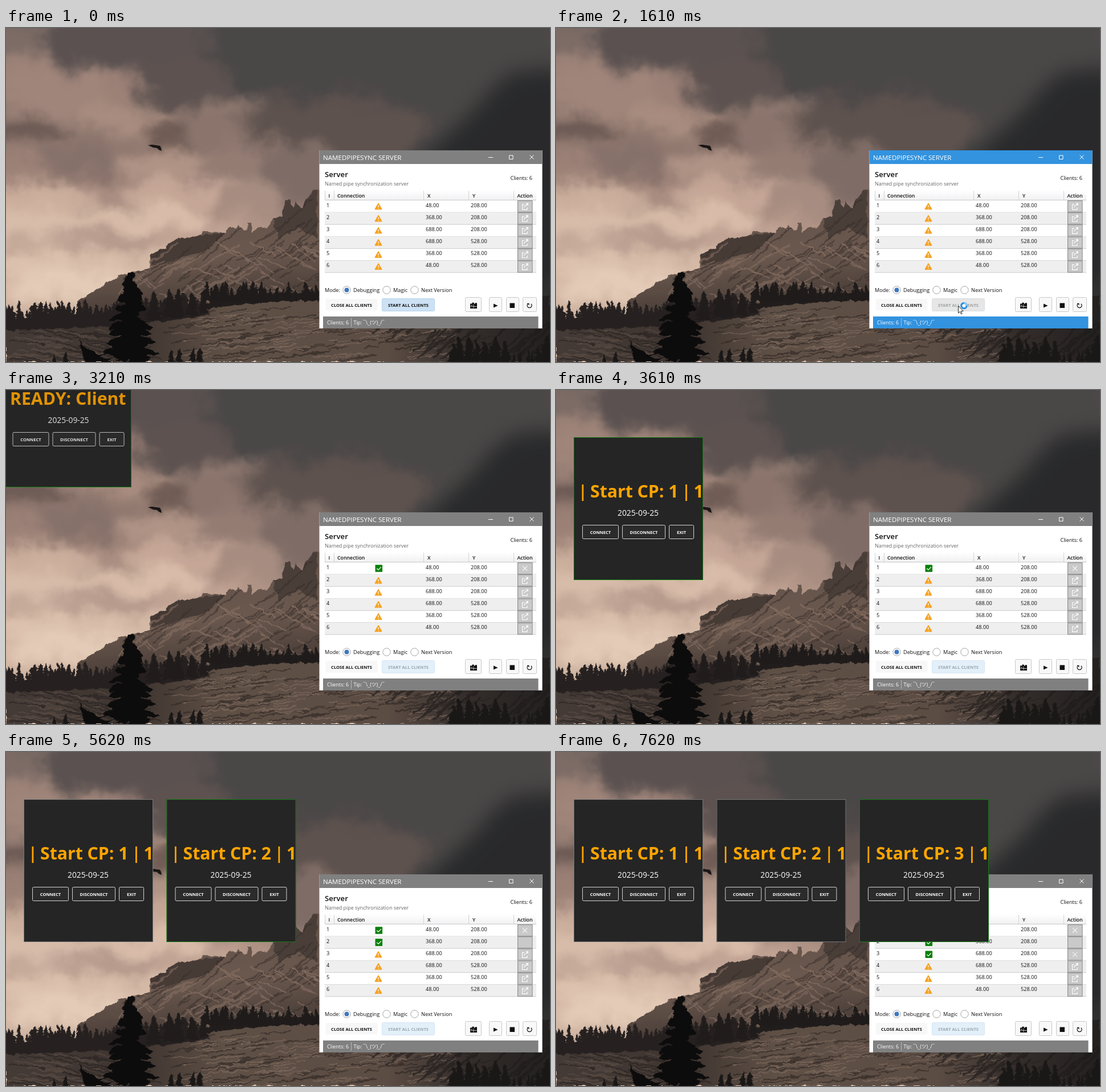
Recreate the animation shown at these times as an HTML page. Size 954 by 587 pixels, loop 8 s.

```html
<!DOCTYPE html>
<html lang="en">
<head>
<meta charset="utf-8">
<title>Pipe sync server</title>
<style>
html, body { margin: 0; width: 100%; height: 100%; overflow: hidden; background: #3a3331; }
svg { position: absolute; left: 0; top: 0; width: 954px; height: 587px; display: block; will-change: transform; }
text { font-family: 'Open Sans', 'Noto Sans', 'Noto Sans CJK JP', sans-serif; white-space: pre; }
</style>
</head>
<body>
<svg id="scene" viewBox="0 0 954 587"></svg>
<svg id="ui" viewBox="0 0 954 587"></svg>
<script>
const LOOP = 8000;
const $ = id => document.getElementById(id);

let seed = 11;
const rnd = () => (seed = (seed * 16807) % 2147483647) / 2147483647;
const between = (a, b) => a + (b - a) * rnd();

const rect = (x, y, w, h, fill, more = '') =>
  `<rect x="${x}" y="${y}" width="${w}" height="${h}" fill="${fill}" ${more}/>`;
const text = (x, y, size, str, fill = '#111', more = '') =>
  `<text x="${x}" y="${y}" font-size="${size}" fill="${fill}" ${more}>${str}</text>`;
const line = (d, stroke, w = 1, more = '') =>
  `<path d="${d}" fill="none" stroke="${stroke}" stroke-width="${w}" ${more}/>`;
const fill = (d, color, more = '') => `<path d="${d}" fill="${color}" ${more}/>`;
const MID = 'text-anchor="middle"';
const BOLD = 'font-weight="700"';

// ---- landscape ----
function spruce(x, base, h, w) {
  const tiers = Math.max(4, Math.round(h / 6));
  const left = [], right = [];
  for (let i = 1; i <= tiers; i++) {
    const y = base - h + h * i / tiers;
    const r = w * Math.min(1, 0.2 + 1.1 * i / tiers);
    left.push([x - r * between(.6, 1.2), y + between(-2, 2)], [x - r * .55, y - 1]);
    right.push([x + r * between(.6, 1.2), y + between(-2, 2)], [x + r * .55, y - 1]);
  }
  const pts = [[x, base - h], ...right, ...left.reverse()];
  return 'M' + pts.map(p => p[0].toFixed(1) + ' ' + p[1].toFixed(1)).join('L') + 'Z';
}

function grove(x0, x1, step, baseAt, hMin, hMax) {
  let d = '';
  for (let x = x0; x < x1; x += step * between(.6, 1.4)) {
    const h = between(hMin, hMax);
    d += spruce(x, baseAt(x), h, h * between(.2, .3));
  }
  return d;
}

function streaks(count, x0, x1, y0, y1, slope, color, width = 2) {
  let d = '';
  for (let i = 0; i < count; i++) {
    const x = between(x0, x1), y = between(y0, y1), w = between(15, 70);
    d += `M${x.toFixed(0)} ${y.toFixed(0)}l${w.toFixed(0)} ${(w * slope * between(.6, 1.4)).toFixed(0)}`;
  }
  return line(d, color, width);
}

function bigTree() {
  let d = 'M216 436L223 587H211Z';
  for (let y = 434; y < 584; y += 4.5) {
    const k = (y - 434) / 150;
    for (const s of [-1, 1]) {
      const e = s * (9 + 40 * Math.min(1, k * 1.3)) * between(.35, 1.1);
      const tip = y + between(0, 9);
      d += `M217 ${y - 3}L${217 + e * .5} ${y - 3}L${217 + e * .8} ${tip - 6}L${217 + e} ${tip}L${217 + e * .8} ${tip + 4}L${217 + e * .55} ${y + 7}L217 ${y + 6}Z`;
    }
  }
  return d;
}

const clouds = `880 120 420 330 #4b4847|640 40 330 110 #4a4747|560 190 180 70 #5e524e|200 25 170 50 #5a5150
|10 70 80 60 #9c8277|110 115 120 40 #a0857a|20 15 60 35 #7d6c66|210 110 50 26 #9c8177|310 95 90 50 #5d5250
|30 178 90 20 #6c5a54|210 165 80 24 #a88c7f|120 235 90 26 #86716a|300 190 60 22 #6d5a53|370 180 60 26 #8a746c
|420 240 90 40 #947c73|270 240 80 24 #b09486|520 260 70 60 #7f6c66|20 250 60 22 #9d8277|60 300 110 30 #cbae9c
|200 285 80 18 #a88c80|310 290 110 26 #c6a797|430 300 60 30 #a78d81|50 350 110 32 #d8bcaa|250 335 110 24 #d9bdaa
|180 372 110 14 #b3978a|60 410 140 26 #dcc2ae|210 415 100 20 #d6bba8|120 450 120 22 #e4ccb8|20 385 60 10 #b99d8f|30 490 110 24 #cfb5a2`
  .split('|').map(s => {
    const [x, y, rx, ry, c] = s.trim().split(' ');
    return `<ellipse cx="${x}" cy="${y}" rx="${rx}" ry="${ry}" fill="${c}"/>`;
  }).join('');

const area = 'filterUnits="userSpaceOnUse" x="-120" y="-120" width="1200" height="840" color-interpolation-filters="sRGB"';
const warp = (id, blur, freq, scale) => `<filter id="${id}" ${area}>
  <feGaussianBlur stdDeviation="${blur}" result="b"/>
  <feTurbulence type="fractalNoise" baseFrequency="${freq}" numOctaves="5" seed="5"/>
  <feDisplacementMap in="b" scale="${scale}" xChannelSelector="R" yChannelSelector="G"/></filter>`;

const ridge = 'M125 480L165 455L200 436L250 421L254 397L275 388L297 371L335 366L345 359L385 360L392 350L402 353L409 347L420 356L424 341L430 343L433 358L444 350L456 352L468 336L484 331L490 303L499 302L503 316L511 304L517 318L530 296L540 284L552 282L600 260V587H125Z';
const ground = 'M0 512L130 505L200 492L350 484L550 470L954 470V587H0Z';

$('scene').innerHTML = `<defs>
  ${warp('cloud', 11, .016, 60)}${warp('rough', .3, .07, 9)}
  <filter id="soft" ${area}><feGaussianBlur stdDeviation="17"/></filter>
  <linearGradient id="sky" x1="0" y1="0" x2="0" y2="1">
    <stop offset=".14" stop-color="#5f5552"/><stop offset=".3" stop-color="#8d776e"/><stop offset=".48" stop-color="#92796f"/>
    <stop offset=".58" stop-color="#c0a292"/><stop offset=".75" stop-color="#d9bfab"/></linearGradient>
  <linearGradient id="hill" x1="0" y1="0" x2=".15" y2="1">
    <stop offset="0" stop-color="#5e4e47"/><stop offset=".5" stop-color="#6a584e"/><stop offset=".75" stop-color="#4a3e38"/></linearGradient>
  <linearGradient id="rock">
    <stop offset="0" stop-color="#443a36"/><stop offset=".25" stop-color="#3f3530"/><stop offset=".4" stop-color="#5f5046"/>
    <stop offset=".7" stop-color="#5c4d44"/><stop offset=".84" stop-color="#352e2b"/><stop offset="1" stop-color="#232020"/></linearGradient>
  <clipPath id="ridgeClip"><path d="${ridge}"/></clipPath>
  <clipPath id="groundClip"><path d="${ground}"/></clipPath></defs>
  <g filter="url(#cloud)">${rect(-120, -120, 1200, 840, 'url(#sky)')}${clouds}</g>
  ${fill('M690 265L760 200L815 150L855 105L885 80L915 75L1000 70V600H690Z', '#27282a', 'filter="url(#soft)" opacity=".94"')}
  <g filter="url(#rough)">${fill(ridge, 'url(#hill)')}
    <g clip-path="url(#ridgeClip)">
      ${fill('M254 397L297 371L385 360L350 392L300 405L254 424Z', '#473b36')}${fill('M468 336L490 303L545 284V370L510 350L480 372Z', '#4a3e39')}
      <g opacity=".55">${streaks(60, 200, 545, 340, 470, -.75, '#372e2b', 2.5)}${streaks(45, 180, 545, 375, 475, .6, '#94796b')}
      ${streaks(25, 180, 420, 400, 470, -.6, '#8b7264', 3)}</g>
    </g></g>
  <g filter="url(#rough)">${fill(ground, 'url(#rock)')}
    <g clip-path="url(#groundClip)" opacity=".6">
      ${streaks(110, 260, 800, 495, 587, -.12, '#2a2321')}${streaks(80, 290, 780, 500, 587, -.1, '#8a7466', 1.6)}
      ${streaks(50, 0, 200, 530, 587, .15, '#5f5149')}${streaks(40, 0, 220, 530, 587, .2, '#26211f')}
      ${streaks(40, 640, 950, 525, 587, -.8, '#1d1a19', 3)}
    </g></g>
  <g filter="url(#rough)">
    ${fill('M0 512L150 502L260 496L350 488V504L290 514L160 526L0 532Z', '#262120')}
    ${fill(grove(0, 350, 8, x => 524 - x * .055, 24, 44), '#262120')}
    ${fill(grove(260, 360, 22, x => 515 - (x - 260) * .15, 40, 56), '#201c1b')}
    ${fill('M345 495L370 470L430 468L550 462V480L470 480L380 490Z', '#211d1c')}
    ${fill(grove(352, 556, 9, () => 481, 22, 38), '#1e1b1a')}
    ${fill(grove(290, 345, 18, () => 592, 22, 36) + grove(785, 960, 12, () => 592, 20, 52) + grove(85, 110, 18, () => 592, 16, 24), '#1a1817')}
    ${fill(bigTree() + 'M128 546l6 14 12 6 14 6 16 2 30 2V587H138l-4-14z', '#0d0c0c')}
  </g>
  ${fill('M249 206L256 205L263 206L270 207L272 211L273 216L268 214L265 211L258 210Z', '#191615')}`;

// ---- server window ----
const rowY = i => 303 + 21.15 * i;
const cells = [['48', '208'], ['368', '208'], ['688', '208'], ['688', '528'], ['368', '528'], ['48', '528']];

const row = ([x, y], i) => {
  const top = rowY(i), base = top + 11.6, cy = top + 10.5;
  return (i % 2 ? rect(559, top, 371, 21.15, '#efefef') : '') +
    rect(559, top + 20.6, 371, .9, '#c9c9c9') +
    text(562, base, 9.2, i + 1) + text(736, base, 9.2, x + '.00') + text(815, base, 9.2, y + '.00') +
    `<g id="warn${i}">${fill(`M653 ${cy - 5}L658.6 ${cy + 5}H647.4Z`, '#f7a11f', 'stroke="#f7a11f" stroke-width="1.6" stroke-linejoin="round"')}
      ${line(`M653 ${cy - 2}v3.6m0 1.4v1.3`, '#fff', 1.2)}</g>
    <g id="ok${i}">${rect(647.5, cy - 6.3, 12.6, 12.6, '#0a800a', 'rx="1"')}${line(`M650.3 ${cy}l2.7 2.7 4.8-5`, '#fff', 1.2)}</g>` +
    rect(897.5, top + .6, 25.5, 20, '#c9c9c9', 'stroke="#858585"') +
    line(`M909 ${cy - 3.4}h-3.5v9h8.5v-3.6M908.5 ${cy + 2}q.5-4 6-4.8M911.5 ${cy - 5.3}h3.7v3.7M915 ${cy - 5}l-3 3`, '#fff', 1.1, `id="open${i}"`) +
    line(`M906 ${cy - 4}l8 8m0-8l-8 8`, '#f4f4f4', 1.1, `id="shut${i}"`);
};

const radio = (x, label, lx, on) =>
  `<circle cx="${x}" cy="460.5" r="6.7" fill="#fff" stroke="#a5a5a5"/>` +
  (on ? `<circle cx="${x}" cy="460.5" r="4" fill="#3f78bd"/>` : '') + text(lx, 464, 9.2, label);
const tool = (x, w) => rect(x + .5, 473.5, w, 25, '#f8f8f8', 'rx="2" stroke="#c8c8c8"');

const server = `
  ${rect(549.5, 215, 391, 313, '#fff')}
  <g id="bars">${rect(549.5, 215, 391, 24, 'inherit')}${rect(556, 507, 377.5, 21, 'inherit')}</g>
  ${text(556, 232, 11.6, 'NAMEDPIPESYNC SERVER', '#fff')}
  ${line('M846 227.5h8M918.5 223.5l7 7m0-7l-7 7', '#fff')}${line('M882.5 224h6.5v6.5h-6.5z', '#fff')}
  ${text(559, 262, 13.2, 'Server', '#111', 'font-weight="600"')}
  ${text(559, 277, 8.9, 'Named pipe synchronization server', '#666')}
  ${text(923, 267, 9.1, 'Clients: 6', '#111', 'text-anchor="end" font-weight="500"')}
  ${rect(559, 285, 371, 18, 'url(#head)')}${rect(559, 302, 371, 1, '#c9c9c9')}
  ${line('M575.5 286v16M732.5 286v16M811.5 286v16M890.5 286v16M559.5 286v16', '#d3d3d3')}
  ${[[565.5, 'I'], [581, 'Connection'], [739, 'X'], [818, 'Y'], [896.5, 'Action']]
    .map(([x, s]) => text(x, 298, 8.8, s, '#111', 'font-weight="600"')).join('')}
  ${cells.map(row).join('')}
  ${text(559, 464, 9.1, 'Mode:')}
  ${radio(597.5, 'Debugging', 609, true)}${radio(667.5, 'Magic', 679)}${radio(716.5, 'Next Version', 728)}
  ${rect(560.5, 476, 91, 20.5, '#f7f7f7', 'rx="2"')}
  ${text(606, 490, 7.6, 'CLOSE ALL CLIENTS', '#111', MID + ' ' + BOLD)}
  <rect id="start" x="659.5" y="475.5" width="92" height="22" rx="2"/>
  ${text(705.5, 490, 7.6, 'START ALL CLIENTS', '#111', MID + ' ' + BOLD + ' id="startText"')}
  ${tool(805, 28)}${tool(847, 22)}${tool(877, 22)}${tool(906, 24)}
  ${fill('M814 484.5h3l1-2h2l1 2h1.5l1-1.5h1.5l1 1.5v8.5h-12zM815.5 487v1h2v-1z', '#111')}
  ${line('M814.5 489.5h11M820 486v6', '#ddd', .8)}
  ${fill('M855 484.5l7.5 3.5-7.5 3.5z', '#111')}${rect(883.5, 483.5, 8.5, 8.5, '#111')}
  ${line('M915.3 484.8a4 4 0 1 0 5.5 0M914 484.3h2.8v2.8', '#111', 1.2)}
  ${text(563, 521, 9, 'Clients: 6', '#fff')}${line('M605.5 510v15', '#ffffff70')}
  ${text(609.5, 521, 8.8, 'Tip: ¯\\_(ツ)_/¯', '#fff')}`;

// ---- client windows ----
const button = (x, w, label) =>
  rect(x + .5, 154.5, w - 1, 24, '#2b2b2b', 'rx="2" stroke="#d4d4d4"') +
  text(x + w / 2, 169.7, 7.6, label, '#fff', MID + ' ' + BOLD);
const title = (x, str) => text(x, 106, 30.2, str, '#ffa500', BOLD);
const bar = x => rect(x, 83, 2.8, 29, '#ffa500');

const client = n => `<g id="win${n}"><g clip-path="url(#frame)">${rect(0, 0, 227, 251, '#252525')}
  <g id="body${n}">
    <g id="ready${n}">${title(10.5, 'READY: Client')}</g>
    <g id="info${n}">${bar(14.5)}${title(29, 'Start CP: ' + n)}${bar(196)}${title(210.5, '1')}</g>
    ${text(113, 138, 13.8, '2025-09-25', '#fff', MID)}
    ${button(15, 64, 'CONNECT')}${button(85, 76, 'DISCONNECT')}${button(167, 44, 'EXIT')}
  </g></g><rect id="edge${n}" x=".5" y=".5" width="226" height="250" fill="none"/></g>`;

$('ui').innerHTML = `<defs>
  <linearGradient id="head" x1="0" y1="0" x2="0" y2="1"><stop offset="0" stop-color="#fff"/><stop offset="1" stop-color="#f0f0f2"/></linearGradient>
  <clipPath id="frame"><rect width="227" height="251"/></clipPath></defs>
  ${server}${client(1)}${client(2)}${client(3)}
  <g id="cursor">${fill('M.5 .5V13L3.4 10.4L5.3 14.7L7.2 13.9L5.3 9.6H9.2Z', '#fff', 'stroke="#111" stroke-width=".9"')}
    <g id="busy"><circle cx="10.5" cy="0" r="4.7" fill="#fff" stroke="#2f8fe0" stroke-width="3.2"/>
      <path id="arc" d="M10.5 -4.7A4.7 4.7 0 0 1 15.2 0" fill="none" stroke="#8fd0ff" stroke-width="2.6"/></g></g>`;

// ---- timeline ----
const at = (keys, t) => keys.reduce((cur, k) => t >= k[0] ? k : cur, keys[0]);
const show = (id, on) => $(id).setAttribute('display', on ? 'inline' : 'none');
const set = (id, o) => { for (const k in o) $(id).setAttribute(k, o[k]); };

// time, x, y, busy
const pointer = [[0], [200, 723, 512], [400, 702, 493], [600, 704, 487], [800, 705, 488],
  [1610, 705, 488, 1], [1810, 716.5, 484, 1], [2210, 716.5, 484], [2610]];
// time, fill, border, label
const startLook = [[0, '#cce1f3', '#b8d4ec', '#111'], [600, '#cccccc', '#b8d4ec', '#111'],
  [1610, '#e6e6e6', '#d9dee2', '#a0a0a0'], [1810, '#e6e6e6', '#d9dee2', '#a8a8a8'], [3210, '#e3eff9', '#d6e6f4', '#9aa7b1']];
const joined = [3210, 5020, 7020];
const focusEnd = [5020, 7020, LOOP];

// time, x, y, content shift, content opacity, window opacity, scale, drop
const opening = (t, shift, ink, alpha, scale, drop) => [t, -7, -80, shift, ink, alpha, scale, drop];
const settle = (t, x) => [[3.5, .86], [1, .96], [0, 1]]
  .map(([shift, ink], i) => [t + 200 * i, x, 83, shift, ink, 1, 1, 0]);
const moves = [
  [[0], opening(3210, 3.5, .86, 1, 1, 0), ...settle(3210, 31).slice(1)],
  [[0], opening(5020, 16, .6, .4, .93, 12), ...settle(5220, 281.5)],
  [[0], ...settle(7220, 532)]
];

function render(t) {
  set('bars', { fill: t >= 1610 && t < 3210 ? '#3393df' : '#808080' });
  const [, bg, border, label] = at(startLook, t);
  set('start', { fill: bg, stroke: border });
  set('startText', { fill: label });

  cells.forEach((_, i) => {
    const on = t >= (joined[i] ?? Infinity);
    show('ok' + i, on);
    show('warn' + i, !on);
    show('open' + i, !on);
    show('shut' + i, on && i !== 1);
  });

  moves.forEach((keys, i) => {
    const n = i + 1;
    const [, x, y, shift, ink, alpha, scale, drop] = at(keys, t);
    show('win' + n, x !== undefined);
    if (x === undefined) return;
    set('win' + n, { opacity: alpha, transform: `translate(${x + 113.5} ${y + 125.5}) scale(${scale}) translate(-113.5 -125.5)` });
    set('body' + n, { opacity: ink, transform: `translate(${shift} ${drop})` });
    set('edge' + n, { stroke: t < focusEnd[i] ? '#147a14' : '#777' });
    show('ready' + n, y < 0);
    show('info' + n, y > 0);
  });

  const [, cx, cy, busy] = at(pointer, t);
  show('cursor', cx !== undefined);
  show('busy', busy);
  if (cx !== undefined) set('cursor', { transform: `translate(${cx} ${cy})` });
  set('arc', { transform: `rotate(${t < 2010 ? 0 : 60} 10.5 0)` });
}

let last = -1;
function tick() {
  const t = performance.now() % LOOP;
  const step = Math.floor(t / 10);
  if (step !== last) render(t);
  last = step;
  requestAnimationFrame(tick);
}
tick();
</script>
</body>
</html>
```
